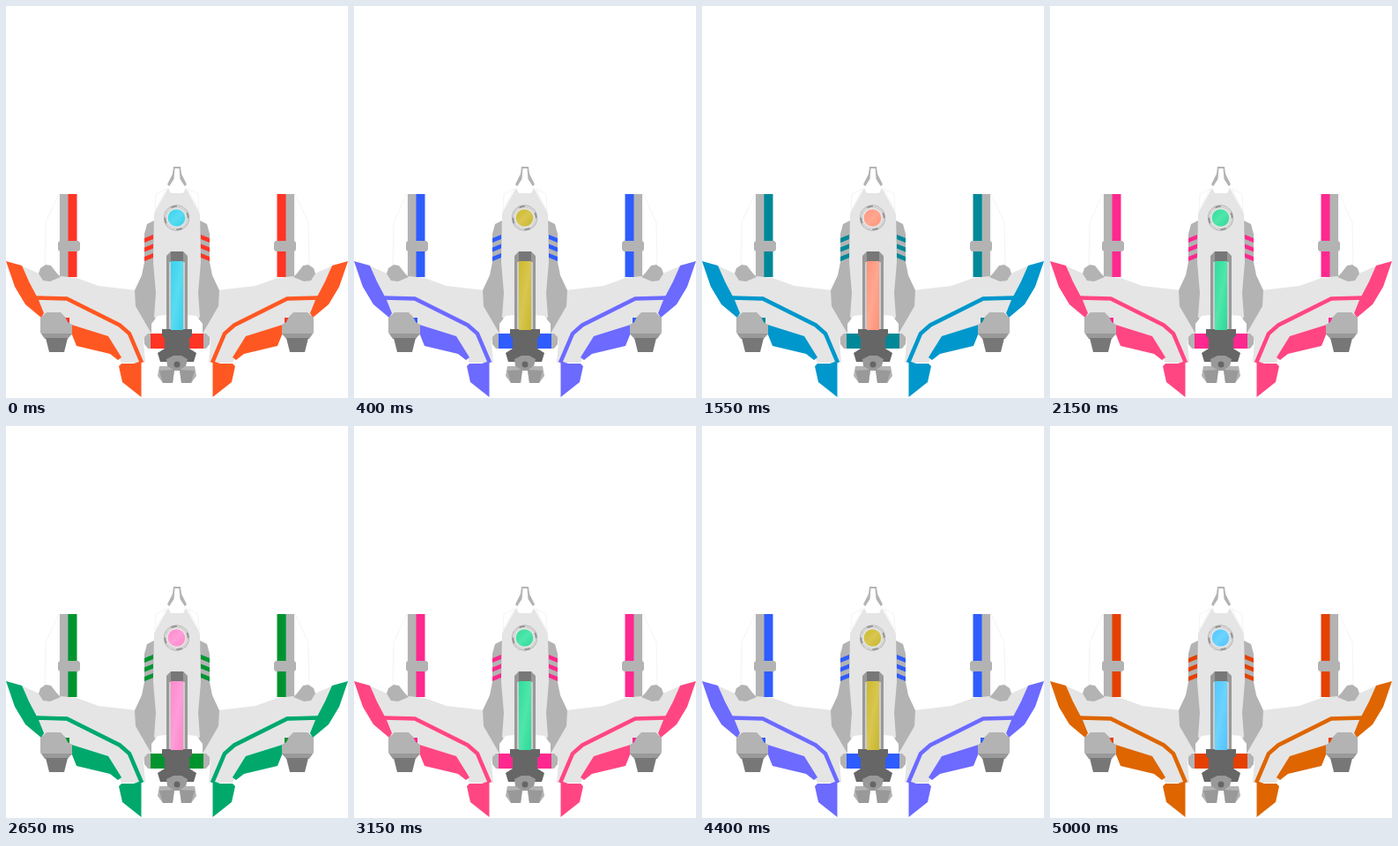
An HTML page for the animation above (5.05 s loop, 388 by 444 pixels).

```html
<!DOCTYPE html>
<html lang="en">
<head>
<meta charset="utf-8">
<title>Color cycling spaceship</title>
<style>
  html, body { margin: 0; width: 100%; height: 100%; overflow: hidden; background: #fff; }
  svg { display: block; width: 388px; height: 444px; }
  .white { fill: #fff; }
  .light { fill: #e5e5e5; }
  .mid { fill: #b3b3b3; }
  .steel { fill: #999; }
  .dark { fill: #666; }
  .orange { fill: #ff5722; }
  .red { fill: #ff3424; }
  .edge { fill: #fff; stroke: #eee; stroke-width: .7; }
  .trim { fill: none; stroke: #ff5722; stroke-width: 4.5; }
</style>
</head>
<body>
<svg id="ship" viewBox="0 0 388 444">
  <defs>
    <linearGradient id="glass" x2="1" y2="1">
      <stop offset="0" stop-color="#38d2ee"/>
      <stop offset=".5" stop-color="#58dcf2"/>
      <stop offset="1" stop-color="#38cdea"/>
    </linearGradient>
    <g id="half">
      <!-- fin -->
      <path class="edge" d="M60 213L45 245 44 296 60 305Z"/>
      <path class="mid" d="M61 213H71V307H61Z"/>
      <path class="red" d="M70.500 213H80.500V307H70.500Z"/>

      <!-- wing -->
      <path class="light" d="M17 294L42 305 62 306 80 308 105 317 148 322 168 374 156 380 158 404 131 404 115 374 70 360 65 350 42 349 30 320Z"/>
      <path class="mid" d="M37 303L39 297 45 293 51 294 58 303 62 307 50 312 42 311Z"/>
      <path class="orange" d="M0 289L18 294 26 312 37 333 43 348 40 353 22 338 10 318Z"/>
      <path class="trim" d="M33 330.500L69 331.500 129 361.500 140 371 154 404"/>
      <path class="orange" d="M68 359L116 374 131 398 127 401 118 394 80 385 74 370Z"/>
      <path class="orange" d="M128 408L131 405H145L153.500 402V443L132 426Z"/>

      <!-- engine pod -->
      <path class="red" d="M66 353H72V371H66Z"/>
      <path class="mid" d="M39 353L46 347H62L67 352 70 358 75 361V372L70 375H43L39 370Z"/>
      <path class="steel" d="M40 371H75L70 377H44Z"/>
      <path fill="#777" d="M45 376H70L66 392H49Z"/>
      <path class="mid" d="M61 266H82L84 268V276L82 278H61L59 276V268Z"/>

      <!-- fuselage side -->
      <path class="edge" d="M182 207L170 213 169 232Z"/>
      <path class="mid" d="M168 243L160 247 157 258V290L154 305 146 322 147 340 165 371H182V243Z"/>
      <path class="light" d="M194 206H184L168 235 167 290 170 325 168 352 178 366H194Z"/>
      <path class="white" d="M182 350L172 351 165 360V371H182Z"/>
      <g class="red">
        <path id="stripe" d="M157 263L167 259V264L157 268Z"/>
        <use href="#stripe" y="10.500"/>
        <use href="#stripe" y="21"/>
      </g>

      <!-- nose -->
      <path class="mid" d="M194 182H190L189 190 183 202 187 206H194Z"/>
      <path class="white" d="M194 184H191.500L190.500 196 184 206 187 212H194Z"/>

      <!-- core housing -->
      <path class="steel" d="M194 278H187L182 283V366H194Z"/>
      <path fill="#ccc" d="M185 290H187V366H185Z"/>
      <path fill="#777" d="M194 278H187V289H194Z"/>

      <!-- tail -->
      <path class="mid" d="M157 375L161 371H166V388H161L157 383Z"/>
      <path class="red" d="M164 371H181V388H164Z"/>
      <path class="mid" d="M174 408H184L191 413 189 427H178L172 419Z"/>
      <path class="steel" d="M174 413L191 412 189 427H178Z"/>
      <path class="dark" d="M194 366H177V374L180 376V388L172 393 175 403H194Z"/>
    </g>
  </defs>
  <use href="#half"/>
  <use href="#half" transform="matrix(-1 0 0 1 388 0)"/>
  <path fill="url(#glass)" d="M187 289H201V367H187Z"/>
  <circle cx="193.500" cy="240" r="14.500" class="steel"/>
  <circle cx="193.500" cy="240" r="12" fill="#e3e3e3"/>
  <circle cx="193.500" cy="240" r="13" fill="none" stroke="#d8d8d8" stroke-width="2" stroke-dasharray="14 6.420"/>
  <circle cx="193.500" cy="240" r="9.800" fill="url(#glass)"/>
  <path class="steel" d="M182 400L190 396H199L206 400 204 408 197 413H191L183 408Z"/>
  <circle cx="194" cy="406" r="3.500" class="dark"/>
</svg>
<script>
  const ship = document.getElementById('ship');
  const LOOP = 5050, STEP = 50, DEGREES = -18;

  // The first color holds for two steps; then the hue makes five turns.
  function draw() {
    const step = Math.floor(performance.now() % LOOP / STEP);
    ship.style.filter = `hue-rotate(${DEGREES * Math.max(0, step - 1)}deg)`;
    requestAnimationFrame(draw);
  }
  draw();
</script>
</body>
</html>
```
